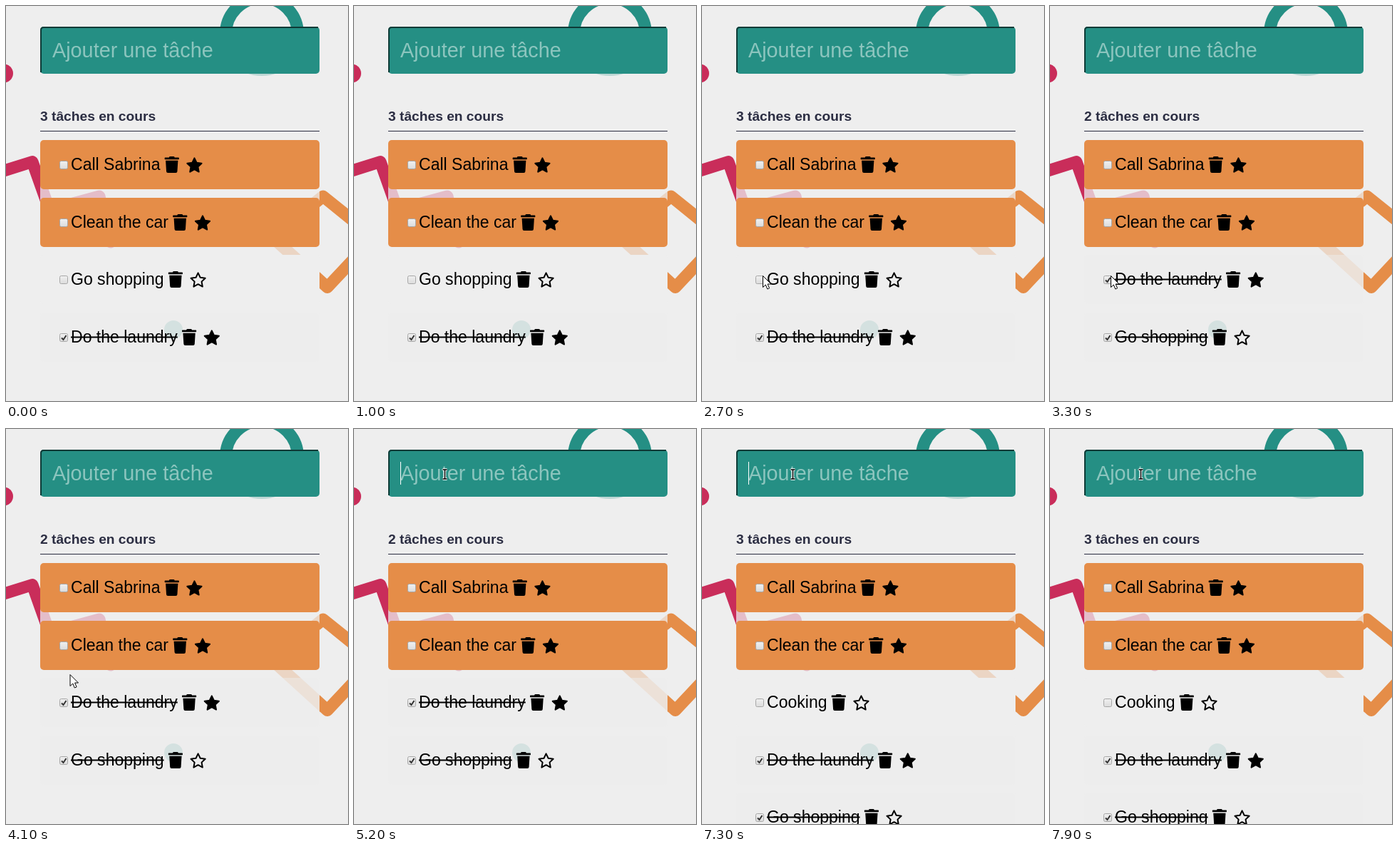
Write an HTML page that moves like this. It is 480 px wide and 554 px high and loops after 8000 ms.

```html
<!DOCTYPE html>
<html lang="fr">
<head>
<meta charset="utf-8">
<style>
  html, body { margin: 0; width: 100%; height: 100%; overflow: hidden; background: #eee; }
  svg { display: block; font-family: "Liberation Sans", Arial, sans-serif; }
  .task { font-size: 23.04px; }
  .field { font-size: 28.8px; }
  .count { font-size: 19.2px; font-weight: bold; fill: #2b2d42; }
  .shape { fill: none; stroke-width: 17; stroke-linecap: round; stroke-linejoin: round; }
</style>
</head>
<body>
<svg width="480" height="554" viewBox="0 0 480 554">
  <defs>
    <linearGradient id="boxFill" x2="0" y2="1">
      <stop stop-color="#f0f0f0"/><stop offset="1" stop-color="#dcdcdc"/>
    </linearGradient>
    <path id="trash" transform="scale(.045)" d="M432 32H312L303 13A24 24 0 0 0 281 0H167A24 24 0 0 0 145 13L136 32H16A16 16 0 0 0 0 48V80A16 16 0 0 0 16 96H432A16 16 0 0 0 448 80V48A16 16 0 0 0 432 32ZM53 467A48 48 0 0 0 101 512H347A48 48 0 0 0 395 467L416 128H32Z"/>
  </defs>

  <rect width="480" height="554" fill="#eee"/>
  <g class="shape">
    <circle cx="359" cy="39" r="50.5" stroke="#258f84"/>
    <path d="M-12 234L37 218.500L61 286L131 267L147 331" stroke="#c92d5a"/>
    <path d="M369 320L451 394.500L492 351M400 303L445 267L492 305" stroke="#e58d48"/>
  </g>
  <circle cx="-3" cy="94.500" r="13" fill="#c92d5a"/>
  <circle cx="235" cy="454" r="13" fill="#258f84"/>
  <rect x="48" y="29" width="392" height="525" fill="#eee" opacity=".75"/>

  <rect x="48" y="29" width="392" height="66" rx="5" fill="#258f84"/>
  <path d="M49 93V34Q49 30 53 30H438" fill="none" stroke="#0d3a36" stroke-width="2"/>
  <text id="field" class="field" x="65" y="72"></text>
  <rect id="caret" y="46" width="1" height="32" fill="#fff"/>

  <text id="count" class="count" x="48" y="161"></text>
  <rect x="48" y="175" width="392" height="1" fill="#2b2d42"/>
  <g id="list"></g>

  <path id="arrow" d="M.5 .5V16.500L4.300 13L6.800 19L9.600 17.800L7.100 12H12Z" fill="#fff" stroke="#000" stroke-linejoin="round"/>
  <g id="beam" fill="none">
    <path d="M-3 -6.500H3M-3 6.500H3M0 -6.500V6.500" stroke="#fff" stroke-width="3.500"/>
    <path d="M-3 -6.500H3M-3 6.500H3M0 -6.500V6.500" stroke="#000" stroke-width="1.500"/>
  </g>
</svg>
<script>
const LOOP = 8000, STEP = 100;
const CHECK_AT = 3200, FOCUS_AT = 4800, SUBMIT_AT = 7200;
const WORD = "Cooking";
const keyTimes = [5700, 5900, 6000, 6100, 6200, 6400, 6700];
const pointerPath = [
  [1900, 422, 64], [2100, 204, 270], [2200, 140, 330], [2400, 92, 372], [2600, 85, 378],
  [4000, 85, 378], [4200, 94, 310], [4400, 115, 145], [4600, 127.5, 63.5], [LOOP, 127.5, 63.5]
];

const $ = id => document.getElementById(id);
const pen = document.createElement("canvas").getContext("2d");
const measure = (text, size) => {
  pen.font = `${size}px "Liberation Sans", Arial, sans-serif`;
  return pen.measureText(text).width;
};

const starPoints = Array.from({ length: 10 }, (_, i) => {
  const r = i % 2 ? 5.2 : 10.6, a = (i / 5 - 0.5) * Math.PI;
  return (r * Math.cos(a)).toFixed(2) + "," + (r * Math.sin(a)).toFixed(2);
}).join(" ");

const task = (name, starred, done) => ({ name, starred, done });

function row({ name, starred, done }, i) {
  const width = measure(name, 23.04), end = 91 + width;
  const fill = starred && !done ? "#e58d48" : "#eee";
  const tick = '<path d="M78 35.500L80.500 38L84.500 32" fill="none" stroke="#333" stroke-width="2"/>';
  return `<g transform="translate(0 ${Math.round(188 + 80.6 * i)})">
    <rect x="48" width="392" height="69" rx="5" fill="${fill}" opacity="${done ? 0.5 : 1}"/>
    <rect x="75.5" y="29.5" width="11" height="11" rx="2" fill="url(#boxFill)" stroke="#a6a6a6"/>
    ${done ? tick : ""}
    <text class="task" x="91" y="42">${name}</text>
    ${done ? `<rect x="91" y="33.500" width="${width}" height="2"/>` : ""}
    <use href="#trash" x="0" transform="translate(${end + 6.2} 23)"/>
    <polygon points="${starPoints}" transform="translate(${end + 48} 36)" fill="${starred ? "#000" : "none"}"
      stroke="#000" stroke-width="2" stroke-linejoin="round"/>
  </g>`;
}

function tasksAt(t) {
  const laundry = task("Do the laundry", true, true);
  const shopping = task("Go shopping", false, t >= CHECK_AT);
  const list = [task("Call Sabrina", true, false), task("Clean the car", true, false)];
  if (t >= SUBMIT_AT) list.push(task(WORD, false, false));
  return list.concat(shopping.done ? [laundry, shopping] : [shopping, laundry]);
}

function drawList(t) {
  const tasks = tasksAt(t);
  $("list").innerHTML = tasks.map(row).join("");
  $("count").textContent = tasks.filter(x => !x.done).length + " tâches en cours";
}

function drawField(t) {
  const typed = t < SUBMIT_AT ? WORD.slice(0, keyTimes.filter(k => k <= t).length) : "";
  $("field").textContent = typed || "Ajouter une tâche";
  $("field").setAttribute("fill", typed ? "#fff" : "#8cc5be");
  const lastInput = [FOCUS_AT, ...keyTimes, SUBMIT_AT].filter(k => k <= t).pop();
  const lit = lastInput !== undefined && (t - lastInput) % 1000 < 500;
  $("caret").setAttribute("x", Math.round(65 + measure(typed, 28.8)));
  $("caret").setAttribute("visibility", lit ? "visible" : "hidden");
}

function drawPointer(t) {
  const next = pointerPath.findIndex(p => p[0] > t);
  let shown = null;
  if (next > 0) {
    const [t0, x0, y0] = pointerPath[next - 1], [t1, x1, y1] = pointerPath[next];
    const k = (t - t0) / (t1 - t0);
    const x = x0 + (x1 - x0) * k, y = y0 + (y1 - y0) * k;
    shown = y < 95 ? "beam" : "arrow";
    $(shown).setAttribute("transform", `translate(${x} ${y})`);
  }
  for (const id of ["arrow", "beam"]) $(id).setAttribute("visibility", id === shown ? "visible" : "hidden");
}

let last = -1;
function frame() {
  const t = Math.floor(performance.now() % LOOP / STEP) * STEP;
  if (t !== last) {
    drawList(t);
    drawField(t);
    drawPointer(t);
    last = t;
  }
  requestAnimationFrame(frame);
}
frame();
</script>
</body>
</html>
```
